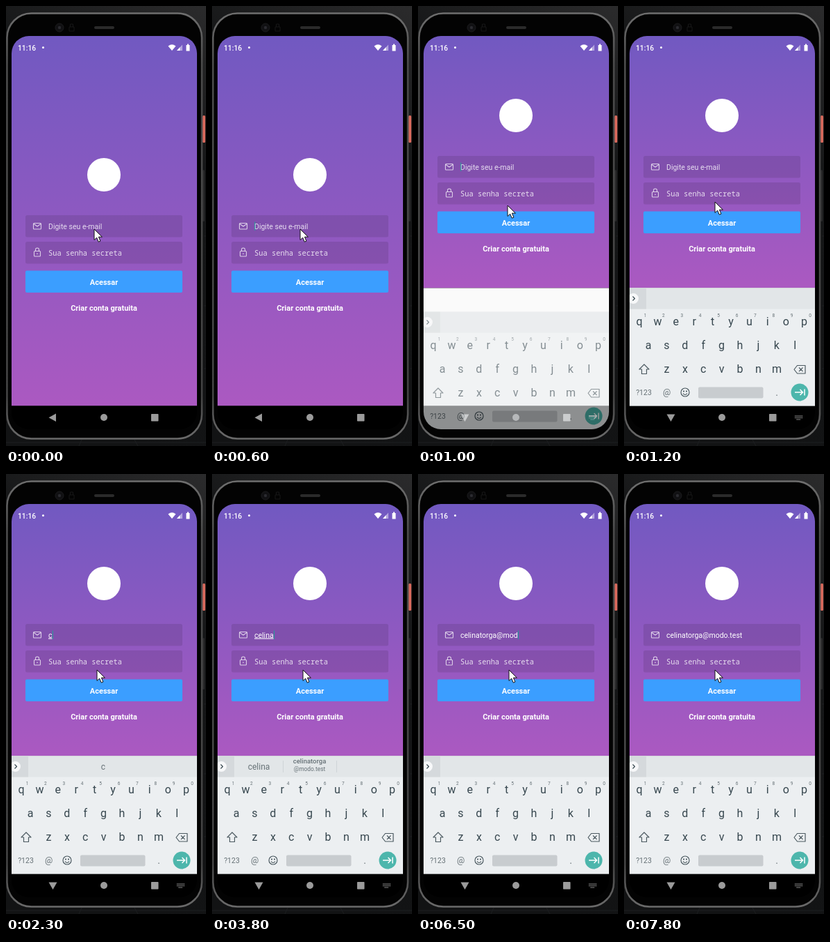
Write an HTML page that moves like this. It is 288x631 px and loops after 8000 ms.

```html
<!DOCTYPE html>
<html lang="pt">
<head>
<meta charset="utf-8">
<title>Login</title>
<style>
html, body { margin: 0; width: 100%; height: 100%; overflow: hidden; background: #121314; }
svg { display: block; width: 100%; height: 100%; font-family: Roboto, sans-serif; }
text { white-space: pre; }
.mid { text-anchor: middle; }
.bold { font-weight: 700; font-size: 11px; fill: #fff; }
.line { fill: none; stroke-linejoin: round; }
</style>
</head>
<body>
<svg viewBox="0 0 288 631">
  <defs>
    <linearGradient id="sky" x2="0" y2="1">
      <stop stop-color="#7159c1"/><stop offset="1" stop-color="#ab59c1"/>
    </linearGradient>
    <linearGradient id="rim" x2="0" y2="1">
      <stop stop-color="#6e6e6e"/><stop offset=".12" stop-color="#4c4c4c"/>
      <stop offset=".9" stop-color="#444"/><stop offset="1" stop-color="#6a6a6a"/>
    </linearGradient>
    <linearGradient id="desk" x1="1" y1="0" x2=".7" y2="1">
      <stop stop-color="#2b2b2c"/><stop offset=".35" stop-color="#151617"/><stop offset="1" stop-color="#121314"/>
    </linearGradient>
    <clipPath id="screen"><rect x="8" y="43" width="267" height="564" rx="25"/></clipPath>
  </defs>

  <!-- desk and phone body -->
  <rect width="288" height="631" fill="url(#desk)"/>
  <path d="M105 631l4-9M190 631l-5-9M0 626h288M285 130h3M285 330h3M285 430h3M285 520h3" stroke="#1d1e20"/>
  <rect x="283" y="157" width="4" height="39" rx="1.5" fill="#d8695c"/>
  <rect x="283" y="235" width="3" height="74" rx="1.5" fill="#2a2a2b"/>
  <rect x="1.5" y="10.5" width="280.500" height="610" rx="35" fill="#030303" stroke="url(#rim)" stroke-width="2.500"/>
  <circle cx="77" cy="31" r="6" fill="#111113" stroke="#1c1c1e"/>
  <circle cx="77" cy="31" r="2.2" fill="#2b2b30"/>
  <path d="M91 30h7v6h-7zM92.500 30v-4h4v4" class="line" stroke="#161617"/>
  <rect x="127" y="29" width="29" height="4" rx="2" fill="#2b2b2b"/>

  <g clip-path="url(#screen)">
    <rect id="back" x="8" y="43" width="267" height="530.500" fill="url(#sky)"/>
    <g id="page">
      <circle cx="141" cy="242" r="24" fill="#fff"/>
      <g fill="#000" fill-opacity=".1">
        <rect x="28" y="300" width="226" height="31.500" rx="2.500"/>
        <rect x="28" y="338" width="226" height="31.500" rx="2.500"/>
      </g>
      <g class="line" stroke="#fff" stroke-opacity=".72" stroke-width="1.100">
        <rect x="39.500" y="311.500" width="11" height="8.500" rx="1"/>
        <path d="M40 312.500l5 3.500 5-3.500"/>
        <rect x="40.500" y="351.500" width="9" height="7.500" rx="1"/>
        <path d="M42.500 351.500v-2a2.500 2.500 0 0 1 5 0v2M44 355.200h2"/>
      </g>
      <text id="email" x="61" y="319.500" font-size="10.500"></text>
      <rect id="caret" y="309.500" width="1" height="12.500" fill="#1fa598"/>
      <text x="61" y="357.500" font-size="10.400" fill="#fff" fill-opacity=".8" style="font-family: 'Noto Sans Mono', monospace">Sua senha secreta</text>
      <rect x="28" y="379.500" width="226" height="31.500" rx="2" fill="#3b9eff"/>
      <text class="mid bold" x="141" y="399.500">Acessar</text>
      <text class="mid bold" x="141" y="436.500">Criar conta gratuita</text>
    </g>
    <rect id="blank" x="8" y="404.500" width="267" height="169" fill="#fafafa"/>

    <g fill="#fff">
      <text x="17" y="63.500" font-size="10.300" font-weight="500">11:16</text>
      <circle cx="53.500" cy="59.500" r="1.500"/>
      <path d="M233.500 57.500q5.500-4.500 11 0l-5.500 6.500z"/>
      <path d="M246 64l8-8.500v8.500z" fill-opacity=".45"/><path d="M246 64l4.500-5v5z"/>
      <path d="M259.500 56h1.500v-1.500h2v1.500h1.500v8.500h-5z"/>
    </g>

    <rect x="8" y="573.500" width="267" height="34" fill="#000"/>
    <g fill="#9b9b9b">
      <path id="navBack"/>
      <circle cx="141" cy="590" r="5"/>
      <rect x="209" y="585" width="10.500" height="10.500" rx=".8"/>
      <path id="navKeys" d="M246 588h11M246 590.500h11M248.500 593h6" stroke="#8a8a8a" stroke-width="1.500" stroke-dasharray="1.300 .7"/>
    </g>

    <g id="keyboard" fill="#37474f">
      <rect x="8" y="404.500" width="267" height="169" fill="#eceff1"/>
      <rect x="8" y="404.500" width="267" height="30" fill="#e2e6e8"/>
      <rect x="8" y="404.500" width="24" height="30" fill="#d5d9dc"/>
      <circle cx="13.500" cy="419.500" r="7.500" fill="#f7f8f9"/>
      <path d="M12.500 416.500l3 3-3 3" class="line" stroke="#37474f" stroke-width="1.200"/>
      <text id="word" class="mid" y="424" font-size="12" fill="#667176"></text>
      <g id="hint" class="mid" fill="#667176">
        <path d="M102.500 411v17M179.500 411v17" stroke="#cfd4d7"/>
        <text x="140.500" y="414.500" font-size="9.500" font-weight="500">celinatorga</text>
        <text x="140.500" y="426" font-size="8.400">@modo.test</text>
      </g>
      <g id="keys" class="mid" font-size="16"></g>
      <g class="line" stroke="#4c5a61" stroke-width="1.200">
        <path d="M29 514l7 7h-3.500v6.500h-7v-6.500h-3.500z"/>
        <path d="M249.500 515.500h11.500v11.500h-11.500l-4.500-5.750zM252 518.500l5.500 5.500m0-5.500l-5.500 5.500"/>
        <circle cx="88" cy="554" r="6"/>
        <path d="M85 555.500q3 4 6 0"/>
      </g>
      <circle cx="86" cy="552.500" r="1"/><circle cx="90" cy="552.500" r="1"/>
      <g class="mid" fill="#667176">
        <text x="28.500" y="558" font-size="10.500">?123</text>
        <text x="61.500" y="558" font-size="12.500">@</text>
        <text x="220" y="558.500" font-size="14">.</text>
      </g>
      <rect x="107" y="546.500" width="93.500" height="16" rx="2" fill="#c8cccf"/>
      <circle cx="253" cy="554" r="12.500" fill="#4db6ac"/>
      <path d="M246 554h11.500m-4-4l4 4-4 4M260 549.500v9" class="line" stroke="#fff" stroke-width="1.500"/>
    </g>
  </g>
  <path id="mouse" d="M0 0v15.500l3.700-3.300 2.500 6 2.700-1.100-2.500-5.900h5z" fill="#fff" stroke="#111" stroke-width="1"/>
</svg>
<script>
const $ = id => document.getElementById(id);
const LOOP = 8000, USER = 'celinatorga', EMAIL = USER + '@modo.test';
const strokes = [2300, 3000, 3400, 3600, 3700, 3800, 4200, 4700, 4800, 4900, 5000, 5300,
  6100, 6300, 6500, 6600, 6800, 6900, 7000, 7100, 7300];
const caretOn = [[600, 1100], [1600, 2100], [2300, 5900], [6100, 7800]];

const label = (s, x, y, attrs = '') => `<text x="${x}" y="${y}" ${attrs}>${s}</text>`;
const row = (letters, x, y) => [...letters].map((c, i) => label(c, x + i * 26.4, y)).join('');
$('keys').innerHTML = row('qwertyuiop', 22, 457.5) + row('asdfghjkl', 35, 491.5) + row('zxcvbnm', 61.5, 525.5) +
  [...'1234567890'].map((c, i) => label(c, 30.5 + i * 26.4, 446, 'font-size="6.5" fill="#667176"')).join('');

const show = (id, on) => $(id).setAttribute('visibility', on ? 'visible' : 'hidden');
const move = (id, x, y) => $(id).setAttribute('transform', `translate(${x} ${y})`);

function draw(t) {
  const open = t >= 900, raised = t >= 1000;

  // panel resize and keyboard entrance
  $('back').setAttribute('height', raised ? 361.5 : 530.5);
  move('page', 0, raised ? -85 : 0);
  show('blank', open);
  show('navKeys', open);
  $('navBack').setAttribute('d', open ? 'M61.500 585.500h12l-6 10.500z' : 'M72 584.500v11.500l-10.500-5.750z');
  const left = Math.max(0, (1200 - t) / 200);
  move('keyboard', 0, 34 * left ** 2);
  $('keyboard').setAttribute('opacity', 1 - .4 * left ** 2);
  $('keyboard').setAttribute('display', raised ? 'inline' : 'none');

  // pointer drifts up while the keyboard opens
  const step = Math.max(0, Math.min(4, t / 100 - 8));
  move('mouse', [127, 127, 129, 131, 131][step], [320, 306, 286, 282, 281][step]);

  // typing
  const n = strokes.filter(s => s <= t).length;
  const text = EMAIL.slice(0, n), composing = n > 0 && n <= USER.length;
  const email = $('email');
  email.textContent = text || 'Digite seu e-mail';
  email.setAttribute('fill', n ? '#fff' : '#e6dcf0');
  email.setAttribute('text-decoration', composing ? 'underline' : 'none');
  $('caret').setAttribute('x', 61.3 + (n ? email.getComputedTextLength() : 0));
  show('caret', caretOn.some(([a, b]) => t >= a && t < b));

  // suggestions
  $('word').textContent = composing ? text : '';
  $('word').setAttribute('x', n > 1 ? 67.5 : 140);
  $('hint').setAttribute('display', composing && n > 1 ? 'inline' : 'none');
}

const start = performance.now();
function tick() {
  const t = (performance.now() - start) % LOOP;
  draw(Math.floor(t / 100) * 100);
  requestAnimationFrame(tick);
}
tick();
</script>
</body>
</html>
```
